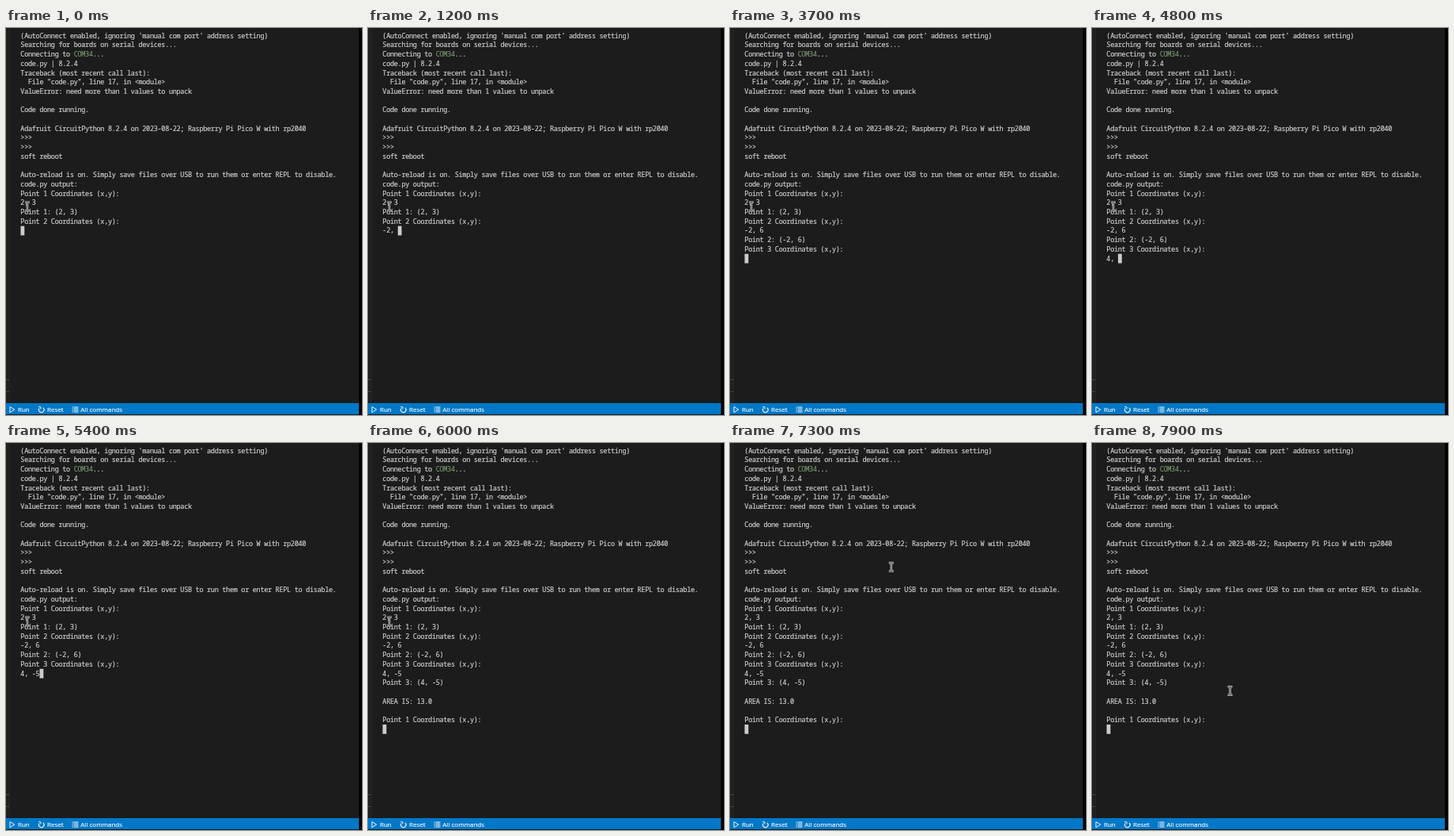
An HTML page with a canvas that plays this animation: 450x488 px, repeating every 8 s.

```html
<!DOCTYPE html>
<html lang="en">
<head>
<meta charset="utf-8">
<title>Serial terminal</title>
<style>
  html, body { margin: 0; width: 100%; height: 100%; overflow: hidden; background: #1c1c1c; }
  canvas { display: block; }
</style>
</head>
<body>
<canvas id="stage" width="450" height="488"></canvas>
<script>
const ctx = document.getElementById('stage').getContext('2d');
const LOOP = 8000;
const LEFT = 18.5, TOP = 9.9, CHAR = 4.81, LINE = 11.7;
const MONO = '"Noto Sans Mono", "DejaVu Sans Mono", monospace';
const MONO_SIZE = 8.5;
const SANS = '"Open Sans", "Noto Sans", sans-serif';
const INK = '#cccccc';

const INTRO = `(AutoConnect enabled, ignoring 'manual com port' address setting)
Searching for boards on serial devices...
Connecting to COM34...
code.py | 8.2.4
Traceback (most recent call last):
  File "code.py", line 17, in <module>
ValueError: need more than 1 values to unpack

Code done running.

Adafruit CircuitPython 8.2.4 on 2023-08-22; Raspberry Pi Pico W with rp2040
>>>
>>>
soft reboot

Auto-reload is on. Simply save files over USB to run them or enter REPL to disable.
code.py output:
Point 1 Coordinates (x,y):
2, 3
Point 1: (2, 3)
Point 2 Coordinates (x,y):
`;

// Terminal output: [time in ms, appended text]
const OUTPUT = [
  [500, '-'], [700, '2'], [1000, ','], [1200, ' '], [1800, '6'],
  [2000, '\nPoint 2: (-2, 6)\nPoint 3 Coordinates (x,y):\n'],
  [4100, '4'], [4400, ','], [4600, ' '], [5000, '-'], [5300, '5'],
  [5700, '\nPoint 3: (4, -5)\n\nAREA IS: 13.0\n\nPoint 1 Coordinates (x,y):\n']
];

// Pointer path: [time, x, y]
const POINTER = [[6000, 27, 225], [6600, 223, 54], [7000, 223, 54], [7700, 174.5, 312.5]];

// Large font scaled down keeps fractional advances exact; the stroke adds a little weight.
function text(str, x, y, size, family, color) {
  ctx.save();
  ctx.translate(x, y);
  ctx.scale(0.1, 0.1);
  ctx.font = `${size * 10}px ${family}`;
  ctx.fillStyle = ctx.strokeStyle = color;
  ctx.lineWidth = 2;
  ctx.fillText(str, 0, 0);
  ctx.strokeText(str, 0, 0);
  ctx.restore();
}

// Terminal text sits on a fixed character grid.
function gridText(str, column, y, color) {
  [...str].forEach((ch, i) => {
    if (ch !== ' ') text(ch, LEFT + (column + i) * CHAR - 0.15, y, MONO_SIZE, MONO, color);
  });
}

function rect(x, y, w, h, color) {
  ctx.fillStyle = color;
  ctx.fillRect(x, y, w, h);
}

function stroke(color, width, build) {
  ctx.beginPath();
  build();
  ctx.strokeStyle = color;
  ctx.lineWidth = width;
  ctx.stroke();
}

function drawPanel() {
  rect(0, 0, 450, 488, '#1c1c1c');
  rect(0, 0, 4, 473, '#202021');
  rect(4, 0, 1, 473, '#262626');
  rect(0, 443, 4, 1, '#4a4a4a');
  rect(0, 458, 4, 1, '#454545');
}

function drawTerminal(t) {
  const shown = INTRO + OUTPUT.filter(([at]) => t >= at).map(([, s]) => s).join('');
  const lines = shown.split('\n');
  lines.forEach((line, row) => {
    const y = TOP + row * LINE + 2.8;
    const port = line.indexOf('COM34');
    if (port < 0) return gridText(line, 0, y, INK);
    gridText(line.slice(0, port), 0, y, INK);
    gridText('COM34', port, y, '#769268');
    gridText(line.slice(port + 5), port + 5, y, INK);
  });
  const row = lines.length - 1;
  rect(LEFT + lines[row].length * CHAR, TOP + row * LINE - 5.9, CHAR, 11.8, INK);
}

function drawStatusBar() {
  rect(0, 473, 446, 14, '#0078c8');
  const ink = '#f2f7fb';
  stroke(ink, 1, () => {
    ctx.moveTo(5, 477.6);
    ctx.lineTo(10.8, 481.2);
    ctx.lineTo(5, 484.8);
    ctx.closePath();
  });
  stroke(ink, 1.1, () => ctx.arc(44.8, 481.4, 3.3, -0.9, Math.PI * 1.2));
  stroke(ink, 1, () => {
    ctx.moveTo(41.2, 477.6);
    ctx.lineTo(44, 478);
    ctx.lineTo(43.8, 480.6);
  });
  for (let i = 0; i < 4; i++) {
    const y = 477.6 + i * 2;
    rect(83.5, y, 1.2, 1, ink);
    rect(85.5, y, 6, 1, ink);
  }
  text('Run', 15, 484.4, 8, SANS, ink);
  text('Reset', 52, 484.4, 8, SANS, ink);
  text('All commands', 94.3, 484.4, 8, SANS, ink);
}

function pointerAt(t) {
  let from = POINTER[0];
  for (const to of POINTER) {
    if (t < to[0]) {
      const p = Math.max(0, (t - from[0]) / (to[0] - from[0] || 1));
      const e = p * p * (3 - 2 * p);
      return [from[1] + (to[1] - from[1]) * e, from[2] + (to[2] - from[2]) * e];
    }
    from = to;
  }
  return from.slice(1);
}

function drawPointer(t) {
  const [x, y] = pointerAt(t);
  const beam = () => {
    for (const s of [-1, 1]) {
      ctx.moveTo(x - 3, y + s * 5.2);
      ctx.lineTo(x + 3, y + s * 5.2);
    }
    ctx.moveTo(x, y - 5.2);
    ctx.lineTo(x, y + 5.2);
  };
  stroke('#c4c4c4', 2.6, beam);
  stroke('#3a3a3a', 0.8, beam);
}

function frame(now) {
  const t = now % LOOP;
  drawPanel();
  drawTerminal(t);
  drawStatusBar();
  drawPointer(t);
  rect(446, 0, 4, 488, '#040404');
  requestAnimationFrame(frame);
}
requestAnimationFrame(frame);
</script>
</body>
</html>
```
